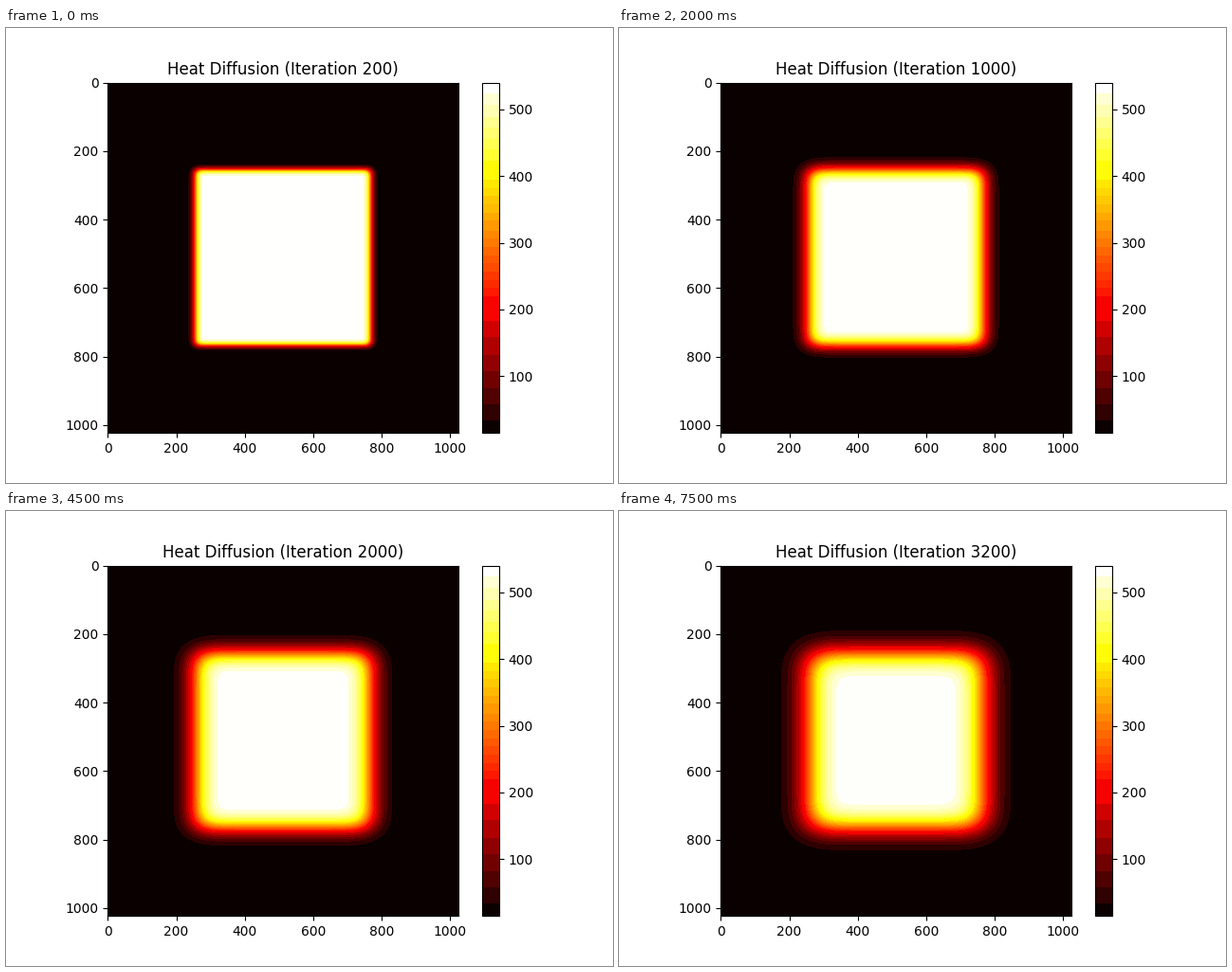
Animation, 640 px wide and 480 px high, one loop 8000 ms. Source, as a matplotlib script:

```python
import math

import matplotlib.pyplot as plt
import numpy as np
from matplotlib.animation import FuncAnimation
from matplotlib.colors import ListedColormap

SIZE = 1024
COLD, HOT = 15.0, 540.0
LO, HI = 255.5, 767.5          # edges of the heated square, in cells
DX, DY = 0.3, 0.2              # diffusion per iteration along each axis
STEP, FRAMES = 200, 16

HOT_RGB = plt.get_cmap("hot")(np.arange(256), bytes=True)[:, :3].astype(int)
BAND = (HOT_RGB[:, 0] >> 5) * 128 + (HOT_RGB[:, 1] >> 4) * 8 + (HOT_RGB[:, 2] >> 5)
BAR_PIXELS = 27                # colorbar pixels per colormap level
CELL_PIXELS = 0.13             # screen pixels per grid cell


def profile(rate, n):
    """Spread of a unit slab after n iterations in one dimension."""
    s = math.sqrt(4 * rate * n)
    return np.array([
        0.5 * (math.erf((i - LO) / s) - math.erf((i - HI) / s))
        for i in range(SIZE)
    ])


def heat(n):
    return np.outer(profile(DY, n), profile(DX, n))


def banded_cmap(u):
    """Hot colormap reduced to bands, each the mean of its visible colours."""
    levels = np.clip((u * 256).astype(int), 0, 255)
    weight = BAR_PIXELS + CELL_PIXELS * np.bincount(levels.ravel(), minlength=256)
    rgb = np.empty((256, 3))
    for band in np.unique(BAND):
        sel = BAND == band
        rgb[sel] = np.floor(np.average(HOT_RGB[sel], axis=0, weights=weight[sel]))
    return ListedColormap(np.minimum((rgb + 0.5) / 255, 1))


fig, ax = plt.subplots(figsize=(6.4, 4.8), dpi=100)
start = heat(STEP)
im = ax.imshow(COLD + (HOT - COLD) * start, cmap=banded_cmap(start),
               vmin=COLD, vmax=HOT)
fig.colorbar(im, ax=ax)
title = ax.set_title("")


def update(frame):
    n = STEP * (frame + 1)
    u = heat(n)
    im.set_data(COLD + (HOT - COLD) * u)
    im.set_cmap(banded_cmap(u))
    title.set_text(f"Heat Diffusion (Iteration {n})")
    return im, title


anim = FuncAnimation(fig, update, frames=FRAMES, interval=500,
                     repeat=True, repeat_delay=0)
plt.show()
```
